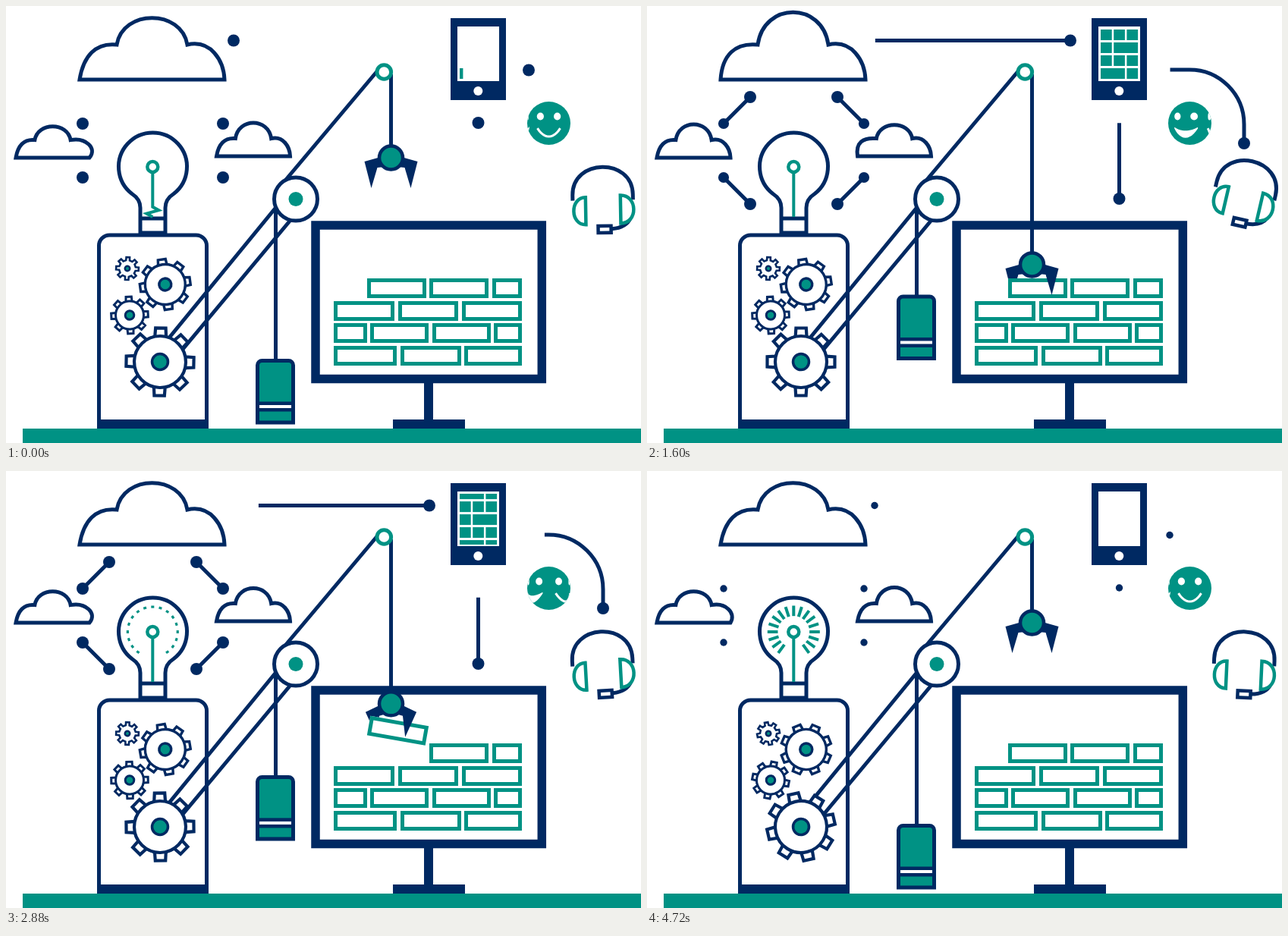
These frames come from a looping animation (837x576 px, 4760 ms). An HTML page with a canvas:

```html
<!DOCTYPE html>
<html lang="en">
<head>
<meta charset="utf-8">
<title>Idea machine</title>
<style>
html, body { margin: 0; width: 100%; height: 100%; overflow: hidden; background: #fff; }
canvas { display: block; }
</style>
</head>
<body>
<canvas id="stage" width="837" height="576"></canvas>
<script>
const ctx = document.getElementById('stage').getContext('2d');
const NAVY = '#002962', GREEN = '#009284', WHITE = '#fff';
const LOOP = 4760, BEAT = 952, SPARK = 980, SPIN = 2380;
const TAU = Math.PI * 2, RAD = Math.PI / 180;

// Quadratic ease in and out between two moments
function ease(t, from, to) {
  const u = Math.min(1, Math.max(0, (t - from) / (to - from)));
  return u < 0.5 ? 2 * u * u : 1 - 2 * (1 - u) * (1 - u);
}

// One soft swell per beat
function swell(t, start, length) {
  const u = ((t - start + LOOP) % BEAT) / length;
  return u < 1 ? Math.sin(Math.PI * u) ** 2 : 0;
}

function paint(path, fill, stroke, width = 5) {
  if (fill) { ctx.fillStyle = fill; ctx.fill(path); }
  if (stroke) { ctx.strokeStyle = stroke; ctx.lineWidth = width; ctx.stroke(path); }
}
function shape(d, fill, stroke, width) { paint(new Path2D(d), fill, stroke, width); }
function poly(points, fill, stroke, width, closed = true) {
  if (points.length) shape('M' + points.join('L') + (closed ? 'Z' : ''), fill, stroke, width);
}
function disc(x, y, r, fill, stroke, width) {
  const path = new Path2D();
  path.arc(x, y, Math.max(0, r), 0, TAU);
  paint(path, fill, stroke, width);
}
function box(x, y, w, h, fill) {
  ctx.fillStyle = fill;
  ctx.fillRect(x, y, w, h);
}
function placed(x, y, degrees, draw) {
  ctx.save();
  ctx.translate(x, y);
  ctx.rotate(degrees * RAD);
  draw();
  ctx.restore();
}

function cloud(x, y, s, left, top, right) {
  const p = (px, py) => [x + px * s, y + py * s];
  shape(`M${p(0, 0)}C${p(5 - 12 * left, -31 - 6 * left)} ${p(21 - 8 * left, -49)} ${p(49, -46)}` +
    `C${p(57, -93 - 21 * top)} ${p(134, -93 - 21 * top)} ${p(142, -46)}` +
    `C${p(173 + 5 * right, -53)} ${p(190 + 14 * right, -25)} ${p(191, 0)}Z`, WHITE, NAVY);
}

function clouds(t) {
  cloud(97, 97, 1, swell(t, 600, 300), swell(t, 330, 420), swell(t, 40, 270));
  cloud(13, 200, 0.508, swell(t, 280, 300), 0.4 * swell(t, 540, 280), 1.6 * swell(t, 820, 290));
  cloud(277.5, 198, 0.508, swell(t, 560, 240), 0.4 * swell(t, 740, 340), 1.6 * swell(t, 40, 200));
}

const SLOW = { span: 2380, grow: [60, 650], leave: [1573, 2273] };
const QUICK = { span: 1190, grow: [50, 350], leave: [750, 1040] };

// A line that travels from one dot to the other and back again
function link(t, d, length, a, b, { span, grow, leave }) {
  const p = t % span, back = Math.floor(t / span) % 2;
  const head = ease(p, ...grow), tail = ease(p, ...leave);
  const from = back ? 1 - head : tail, to = back ? 1 - tail : head;
  if (to > from) {
    ctx.setLineDash([0, from * length, (to - from) * length, length * 2]);
    shape(d, null, NAVY);
    ctx.setLineDash([]);
  }
  const near = 8 * (1 - ease(p, leave[0] - 60, leave[0]));
  const pulse = p > span - 100 ? 3.5 * Math.sin(Math.PI * (p - span + 100) / 100) : 0;
  const far = 8 * ease(p, grow[1], grow[1] + 80) - pulse;
  disc(...(back ? b : a), near, NAVY);
  disc(...(back ? a : b), far, NAVY);
}

function links(t) {
  link(t, 'M300 45.5H558', 258, [300, 45.5], [558, 45.5], SLOW);
  link(t, 'M622.5 154V254', 100, [622.5, 154], [622.5, 254], SLOW);
  link(t, 'M689 84H715A72 72 0 0 1 787 156V181', 164, [689, 84.5], [787, 181], SLOW);
  for (const [x, dx] of [[101, 35], [286, -35]])
    for (const [y, dy] of [[155, -35], [226, 35]])
      link(t, `M${x} ${y}l${dx} ${dy}`, 49.5, [x, y], [x + dx, y + dy], QUICK);
}

function phone(t) {
  box(586, 16, 73, 108, NAVY);
  box(595, 27, 55, 72, WHITE);
  disc(622.3, 112, 6, WHITE);
  const rows = [[[0, 1], [1, 1], [2, 1]], [[0, 1], [1, 2]], [[0, 1], [1, 1], [2, 1]], [[0, 2], [2, 1]]];
  const scroll = 68 * ease(t, 2700, 3400);
  ctx.save();
  ctx.beginPath();
  ctx.rect(598, 30, 50, 67);
  ctx.clip();
  rows.forEach((cells, row) => cells.forEach(([col, size]) => {
    const wait = (3 - row) * 140 + col * 70;
    const shown = ease(t, wait - 70, wait + 200) - ease(t, 3640 + wait / 2, 3800 + wait / 2);
    const y = 31 + (row * 17 + scroll) % 68;
    for (const top of [y, y - 68])
      box(598 + col * 17.2, top, (size * 17.2 - 2.5) * shown, 14, GREEN);
  }));
  ctx.restore();
}

// Two faces on a turning ball, one smiling and one grinning
function ball(t) {
  const R = 28.5, x = 715.5, p = t % SPIN;
  const turn = 100 * (ease(p, 0, 1000) - ease(p, 1360, 2360));
  disc(x, 154.5, R, GREEN);
  ctx.save();
  ctx.beginPath();
  ctx.arc(x, 154.5, R, 0, TAU);
  ctx.clip();
  [turn, turn - 100].forEach((centre, grin) => {
    const px = lon => x + R * Math.sin((centre + lon) * RAD);
    const seen = lon => Math.abs(centre + lon) < 90;
    for (const lon of [-23, 23]) if (seen(lon)) {
      ctx.beginPath();
      ctx.ellipse(px(lon), 145.5, 5 * Math.cos((centre + lon) * RAD), 5, 0, 0, TAU);
      ctx.fillStyle = WHITE;
      ctx.fill();
    }
    const lons = Array.from({ length: 13 }, (_, i) => (i - 6) * 5.3).filter(seen);
    const curve = depth => lons.map(l => [px(l), 161 + depth * (1 - (l / 32) ** 2)]);
    if (grin) poly([...curve(12), ...curve(4).reverse()], WHITE, WHITE, 1.5);
    else poly(curve(11), null, WHITE, 3, false);
  });
  ctx.restore();
}

function headset(t) {
  const s = Math.sin(TAU * (t + 10) / BEAT);
  placed(787, 262 - 10 * s * s, -14 * s, () => {
    shape('M-40 -6V-13C-40 -62 39.500 -62 39.500 -13V-6', null, NAVY);
    shape('M36 18Q30 31 11 32', null, NAVY);
    shape('M-23 -10V26C-44 26 -44 -10 -23 -10Z', WHITE, GREEN, 4.5);
    shape('M23 -12V25C46 25 46 -12 23 -12Z', WHITE, GREEN, 4.5);
    shape('M-7 28H10V37H-7Z', WHITE, NAVY, 4.5);
  });
}

function bulb(t) {
  const x = 193.3, p = t % SPARK;
  shape('M177 299V266C177 258 173 252 166 247.500A45 45 0 1 1 221 247.500C214 252 210 258 210 266V299Z', WHITE, NAVY);
  shape('M177 280H210', null, NAVY);

  // The zigzag climbs the filament
  const top = 265 - 0.23 * p, wire = [[x, 219]];
  for (let i = 0; i <= 9; i++) {
    const y = top + i * 4.4;
    if (y > 219 && y < 277) wire.push([x + (i % 9 ? (i % 2 ? 8 : -8) : 0), y]);
  }
  wire.push([x, 278]);
  poly(wire, null, GREEN, 4, false);
  disc(x, 212, 7, WHITE, GREEN, 4.5);

  const outer = 17 + 17.5 * ease(p, 650, 780), inner = 20 + 14.5 * ease(p, 760, 1000);
  if (p > 650 && outer > inner)
    for (let i = -8; i <= 8; i++)
      placed(x, 212, i * 18, () => box(-2, -outer, 4, outer - inner, GREEN));
}

function gear(x, y, r, tip, width, hub, degrees, ring = true) {
  placed(x, y, degrees, () => {
    const points = [], at = (radius, angle) => [radius * Math.sin(angle), -radius * Math.cos(angle)];
    for (let i = 0; i < 8; i++) {
      const a = i * TAU / 8;
      points.push(at(r, a - 0.22), at(tip, a - 0.15), at(tip, a + 0.15), at(r, a + 0.22));
    }
    poly(points, WHITE, NAVY, width);
    if (ring) disc(0, 0, r, WHITE, NAVY, width);
    disc(0, 0, hub, GREEN, NAVY, Math.min(width, 3.5));
  });
}

function cabinet() {
  const body = new Path2D();
  body.roundRect(122.5, 302, 142, 260, 14);
  paint(body, WHITE, NAVY);
  box(120, 545, 147, 12, NAVY);
  box(0, 557, 837, 19, WHITE);
  box(22, 557, 815, 19, GREEN);
}

function gears(t) {
  const a = 0.14 * t;
  gear(160, 346, 11, 15, 2.6, 3.2, a + 3, false);
  gear(209.8, 367, 26.5, 33.5, 3.4, 8, a - 8);
  gear(163, 407.500, 18.5, 24.5, 3, 5.8, -a - 3);
  gear(203, 469, 34, 45, 4.2, 10.5, a + 1);
}

function clawY(t) {
  return 200 + 141 * ease(t, 510, 1620) - 152 * ease(t, 2720, 3200) + 11 * ease(t, 3200, 3360);
}

function crane(t) {
  shape('M490 85L368 230M357 264L212 441M376 281L230 456', null, NAVY);
  const y = 467.5 - 0.6 * (clawY(t) - 200);
  shape(`M355.500 262V${y}`, null, NAVY);
  const weight = new Path2D();
  weight.roundRect(331.5, y, 47, 81.5, [6, 6, 0, 0]);
  paint(weight, GREEN, NAVY);
  box(331, y + 54, 48, 13, NAVY);
  box(334, y + 58.5, 42, 4, WHITE);
  disc(382, 254.5, 28.5, WHITE, NAVY);
  disc(382, 254.5, 9.5, GREEN);
}

function brick(x, y, w, h = 26) {
  ctx.fillStyle = WHITE;
  ctx.fillRect(x, y, w, h);
  ctx.strokeStyle = GREEN;
  ctx.lineWidth = 5;
  ctx.strokeRect(x + 2.5, y + 2.5, w - 5, h - 5);
}

function monitor() {
  shape('M408 289H706.300V491.500H408Z', WHITE, NAVY, 11.5);
  box(551, 496, 12, 50, NAVY);
  box(510, 545, 95, 12, NAVY);
  const rows = [
    [359, 558, 636, 641, 680],
    [389, 432, 512, 517, 596, 601, 680],
    [418, 432, 476, 480, 557, 562, 639, 643, 680],
    [448, 432, 515, 520, 600, 604, 680]
  ];
  for (const [y, ...edges] of rows)
    for (let i = 0; i < edges.length; i += 2) brick(edges[i], y, edges[i + 1] - edges[i]);
}

function claw(t) {
  const PICK = 2680, DROP = 4330, held = t >= PICK && t < DROP;
  const swingTime = t - 3320;
  const swing = swingTime > 0 && swingTime < 800
    ? -5.4 * Math.sin(TAU * swingTime / 800) * (1 - swingTime / 1100) * 1.15 : 0;
  const grip = 10 * (ease(t, 1680, 1900) - ease(t, 4300, 4440));
  const finger = side => placed(0, 0, side * grip, () =>
    poly([[35, 5], [10, -2], [8, 12], [18, 13], [26, 40]].map(([x, y]) => [side * x, y]), NAVY));
  const loose = () => {
    const u = Math.min(1, Math.max(0, (t - DROP) / 270)), fall = t < PICK ? 1 : u * u;
    placed(516.5 - 1.5 * fall, 235.5 + 136.5 * fall, 10 * (1 - fall), () => brick(-39, -13, 78));
  };

  placed(507.5, 90, swing, () => {
    const y = clawY(t) - 90;
    box(-2.5, 0, 5, y, NAVY);
    ctx.translate(0, y);
    finger(-1);
    if (held) {
      const k = ease(t, PICK, 2850);
      placed(7.5 + 1.5 * k, 31 + 4.5 * k, 10 * k, () => brick(-39, -13, 78));
    }
  });
  if (!held) loose();
  placed(507.5, 90, swing, () => {
    ctx.translate(0, clawY(t) - 90);
    finger(1);
    disc(0, 0, 15.5, GREEN, NAVY, 4.5);
  });
  disc(498.3, 87, 9.3, WHITE, GREEN);
}

function draw(now) {
  const t = now % LOOP;
  box(0, 0, 837, 576, WHITE);
  for (const part of [clouds, links, phone, ball, headset, bulb, cabinet, crane, gears, monitor, claw]) part(t);
  requestAnimationFrame(draw);
}
requestAnimationFrame(draw);
</script>
</body>
</html>
```
